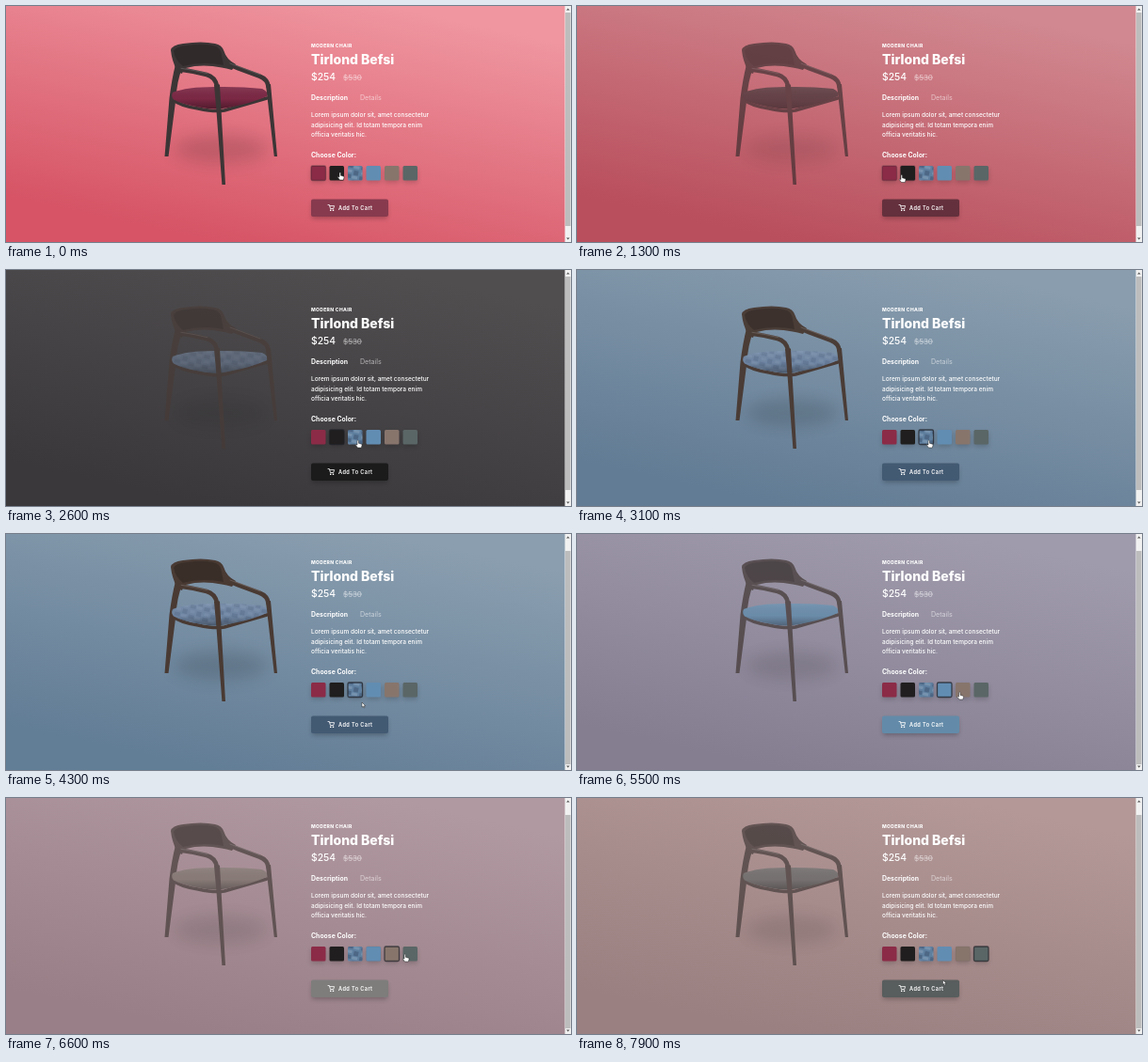
Write an HTML page that moves like this. It is 600 by 251 pixels and loops after 8 s.

```html
<!DOCTYPE html>
<html lang="en">
<head>
<meta charset="utf-8">
<title>Chair shop</title>
<style>
  html, body { margin: 0; width: 100%; height: 100%; overflow: hidden; }
  svg { display: block; width: 100vw; height: 100vh; }
  text { font-family: Inter, "Open Sans", sans-serif; fill: #fff; }
  .soft { opacity: .58; }
  .semi { font-weight: 650; font-size: 6.9px; }
  .body { font-weight: 500; font-size: 6.5px; }
  .line { fill: none; stroke-linecap: round; stroke-linejoin: round; }
</style>
</head>
<body>
<svg viewBox="0 0 600 251">
  <defs>
    <linearGradient id="backdrop" gradientUnits="userSpaceOnUse" x1="335" y1="-15" x2="275" y2="262">
      <stop id="top"/><stop id="bottom" offset="1"/>
    </linearGradient>
    <linearGradient id="shade" x2="0" y2="1">
      <stop stop-color="#fff" stop-opacity=".08"/>
      <stop offset=".55" stop-opacity=".02"/>
      <stop offset="1" stop-opacity=".35"/>
    </linearGradient>
    <pattern id="denim" width="15" height="11" patternUnits="userSpaceOnUse" patternTransform="rotate(12)">
      <path d="M0 0h6v4H0zM8 6h5v5H8z" fill="#32445f" opacity=".4"/>
      <path d="M7 1h6v3H7zM1 6h5v3H1z" fill="#a9bdd3" opacity=".3"/>
    </pattern>
    <filter id="blur" x="-50%" y="-50%" width="200%" height="200%"><feGaussianBlur stdDeviation="2.4"/></filter>
    <filter id="wideBlur" x="-50%" y="-80%" width="200%" height="260%"><feGaussianBlur stdDeviation="9"/></filter>
  </defs>

  <rect width="600" height="251" fill="url(#backdrop)"/>

  <g id="page">
    <g id="chair">
      <ellipse cx="228" cy="152" rx="50" ry="15" opacity=".14" filter="url(#wideBlur)"/>
      <g class="wood">
        <path d="M175 47Q176 41.5 188 40Q208 37 222 40Q229 41 231.5 48Q234 57 244 62L240 68Q234 66 229 65.5Q208 61.5 191 66Q188 68 187 72L182 70Q176 58 175 47Z"/>
        <path d="M180 62L187 66Q181.5 80 180.5 98L172.5 160H168.5L173.5 98Q176 78 180 62Z"/>
        <path class="line" d="M177 99Q184 106 204 109Q222 113 232 111L277 98" stroke-width="3.4"/>
      </g>
      <path d="M178 48Q180 43 191 42Q208 39.5 220 42Q227 43.5 228.5 50L231 63Q208 58.5 188 64Q180 58 178 48Z" opacity=".2"/>
      <g id="seat">
        <path id="cushion" d="M177 92Q192 86 222 86Q250 85.5 272 88Q279 91 277 96Q262 103 236 108Q222 111 205 107.5Q186 104 178 99.5Q175 96 177 92Z"/>
        <use href="#cushion" id="weave" fill="url(#denim)" opacity=".45"/>
        <use href="#cushion" fill="url(#shade)"/>
      </g>
      <g class="wood">
        <path d="M221 84L227 83.5L233 190H229.4L223.5 112Z"/>
        <path d="M276 84L281 83L288 160H284.8Z"/>
        <path class="line" d="M184 67.5Q200 69.5 213 73Q222 75.5 224 85" stroke-width="4.6"/>
        <path class="line" d="M232 55Q235 62 246 66L269 74.5Q278 78 278.6 86" stroke-width="4.6"/>
      </g>
      <path class="line" d="M186 66.3Q202 68.5 214 71.7M238 61L270 73" stroke="#fff" stroke-width="1" opacity=".16"/>
    </g>

    <text x="324" y="44" font-size="5" font-weight="800" letter-spacing=".34">MODERN CHAIR</text>
    <text x="324" y="61.7" font-size="14" font-weight="800">Tirlond Befsi</text>
    <text x="324" y="79" font-size="10.3" font-weight="500">$254</text>
    <g class="soft">
      <text x="358" y="78.7" font-size="8">$530</text>
      <path d="M358 76h20" stroke="#fff" stroke-width=".8"/>
      <text x="376" y="99.7" font-size="7.1">Details</text>
    </g>
    <text x="324" y="99.7" class="semi">Description</text>
    <text x="324" y="118" class="body">Lorem ipsum dolor sit, amet consectetur</text>
    <text x="324" y="128.7" class="body">adipisicing elit. Id totam tempora enim</text>
    <text x="324" y="139.4" class="body">officia veritatis hic.</text>
    <text x="324" y="160.5" class="semi">Choose Color:</text>
    <g id="swatches"></g>

    <rect x="325" y="209" width="80" height="17" opacity=".25" filter="url(#blur)"/>
    <rect id="button" x="324" y="205.5" width="82" height="18.5" rx="2"/>
    <path class="line" d="M342 211.5h1.4l1.1 4h3.2l.9-2.9h-4.6" stroke="#fff" stroke-width=".8"/>
    <path d="M344 216.6h1.4v1.3H344zM346.8 216.6h1.4v1.3h-1.4z" fill="#fff"/>
    <text x="353" y="216.7" font-size="5.6" font-weight="600" letter-spacing=".4">Add To Cart</text>
  </g>

  <rect x="593.5" width="6.5" height="251" fill="#f1f1f1"/>
  <rect id="thumb" x="594" y="7" width="5.5" height="227" fill="#bdbdbd"/>
  <path d="M595 4.5l1.8-2 1.8 2zM595 246.5l1.8 2 1.8-2z" fill="#555"/>

  <g id="cursor" fill="#fff" stroke="#222" stroke-width=".5" stroke-linejoin="round">
    <path id="hand" d="M0 .6Q.8-.4 1.5.6V3.3L4.6 4.2Q5.2 4.5 5 5.4L4.4 8H.5L-1.7 5.2Q-1.6 4.2-.7 4.7L0 5.2Z"/>
    <path id="arrow" d="M0 0V5.2L1.2 4.1 2 6 2.9 5.6 2.1 3.8H3.7Z"/>
  </g>
</svg>

<script>
const LOOP = 8000, STEP = 100;
const $ = id => document.getElementById(id);

// One entry per selectable colour, with the time its transition starts.
const themes = [
  { start: -2000, length: 900, top: [239, 150, 160], bottom: [214, 84, 101], seat: '#7d2946', wood: '#3c3536', button: [135, 58, 78], swatch: '#8b2b47' },
  { start: 950, length: 900, top: [76, 72, 72], bottom: [55, 51, 52], seat: '#2b2a2c', wood: '#2f2929', button: [27, 27, 27], swatch: '#201e1e' },
  { start: 2290, length: 1000, top: [138, 158, 175], bottom: [98, 125, 150], seat: '#7188a6', wood: '#493a33', button: [67, 90, 115], swatch: '#5f7f9f' },
  { start: 5050, length: 800, top: [169, 154, 171], bottom: [147, 126, 143], seat: '#648fb0', wood: '#4b4140', button: [99, 139, 169], swatch: '#628db2' },
  { start: 6150, length: 900, top: [185, 152, 150], bottom: [158, 127, 126], seat: '#80776f', wood: '#4b413f', button: [128, 124, 121], swatch: '#87756c' },
  { start: 7450, length: 900, top: [174, 152, 153], bottom: [150, 128, 130], seat: '#676a69', wood: '#49403e', button: [86, 91, 91], swatch: '#5a6666' }
];

// Keyframes: time, then values.
const pointerPath = [
  [0, 354, 177], [100, 344, 179.5], [1500, 344, 179.5], [1800, 373, 181], [3400, 373, 181],
  [3600, 378, 179], [4300, 378, 179], [4800, 391, 172], [5100, 391, 172], [5500, 405.5, 168],
  [6200, 405.5, 168], [6600, 423, 166], [7500, 423, 166], [7900, 388.5, 193.5]
];
const scrollPath = [[0, 0], [3400, 0], [3500, 6], [3600, 11], [3800, 11], [3900, 12]];

const clamp = x => Math.max(0, Math.min(1, x));
const easeInOut = x => x < .5 ? 8 * x ** 4 : 1 - 8 * (1 - x) ** 4;
const blend = (a, b, p) => `rgb(${a.map((v, i) => Math.round(v + (b[i] - v) * p))})`;

function along(path, time) {
  const next = path.findIndex(key => key[0] > time);
  if (next < 0) return path[path.length - 1].slice(1);
  const a = path[next - 1], b = path[next];
  const p = (time - a[0]) / (b[0] - a[0]);
  return a.slice(1).map((v, i) => v + (b[i + 1] - v) * p);
}

$('swatches').innerHTML = themes.map(({ swatch }, i) => {
  const x = 324 + i * 19.5;
  const box = `x="${x}" y="170" width="15.5" height="15.5" rx="1.5"`;
  const cloth = i === 2 ? `<rect ${box} fill="url(#denim)"/>` : '';
  return `<rect x="${x}" y="173" width="15.5" height="15" opacity=".17" filter="url(#blur)"/>
    <rect ${box} fill="${swatch}"/>${cloth}
    <rect class="ring" ${box} fill="none" stroke="#202329" stroke-width="1.3"/>`;
}).join('');
const rings = [...document.querySelectorAll('.ring')];
const woodParts = [...document.querySelectorAll('.wood path')];

function draw(time) {
  const current = themes.findLastIndex(theme => theme.start <= time);
  const theme = themes[current], before = themes[Math.max(0, current - 1)];
  const p = clamp((time - theme.start) / theme.length);
  const snap = clamp((p - .33) / .18);

  $('top').setAttribute('stop-color', blend(before.top, theme.top, easeInOut(p)));
  $('bottom').setAttribute('stop-color', blend(before.bottom, theme.bottom, easeInOut(p)));
  $('button').setAttribute('fill', blend(before.button, theme.button, snap));

  $('chair').setAttribute('opacity', 1 - (1 - p) ** 2);
  $('seat').setAttribute('fill', theme.seat);
  $('weave').setAttribute('visibility', current === 2 ? 'visible' : 'hidden');
  for (const part of woodParts) {
    const isLine = part.classList.contains('line');
    part.setAttribute(isLine ? 'stroke' : 'fill', theme.wood);
  }
  rings.forEach((ring, i) => {
    const strength = i === current ? snap : i === current - 1 ? 1 - snap : 0;
    ring.setAttribute('opacity', strength * (i ? .75 : .35));
  });

  const [scroll] = along(scrollPath, time);
  $('page').setAttribute('transform', `translate(0 ${-scroll})`);
  $('thumb').setAttribute('y', 7 + scroll * .92);

  const [x, y] = along(pointerPath, time);
  const isArrow = (time >= 3500 && time < 4600) || time >= 7700;
  $('cursor').setAttribute('transform', `translate(${x} ${y})`);
  $('hand').setAttribute('visibility', isArrow ? 'hidden' : 'visible');
  $('arrow').setAttribute('visibility', isArrow ? 'visible' : 'hidden');
}

const origin = performance.now();
function tick() {
  const elapsed = (performance.now() - origin) % LOOP;
  draw(Math.floor(elapsed / STEP) * STEP);
  requestAnimationFrame(tick);
}
tick();
</script>
</body>
</html>
```
